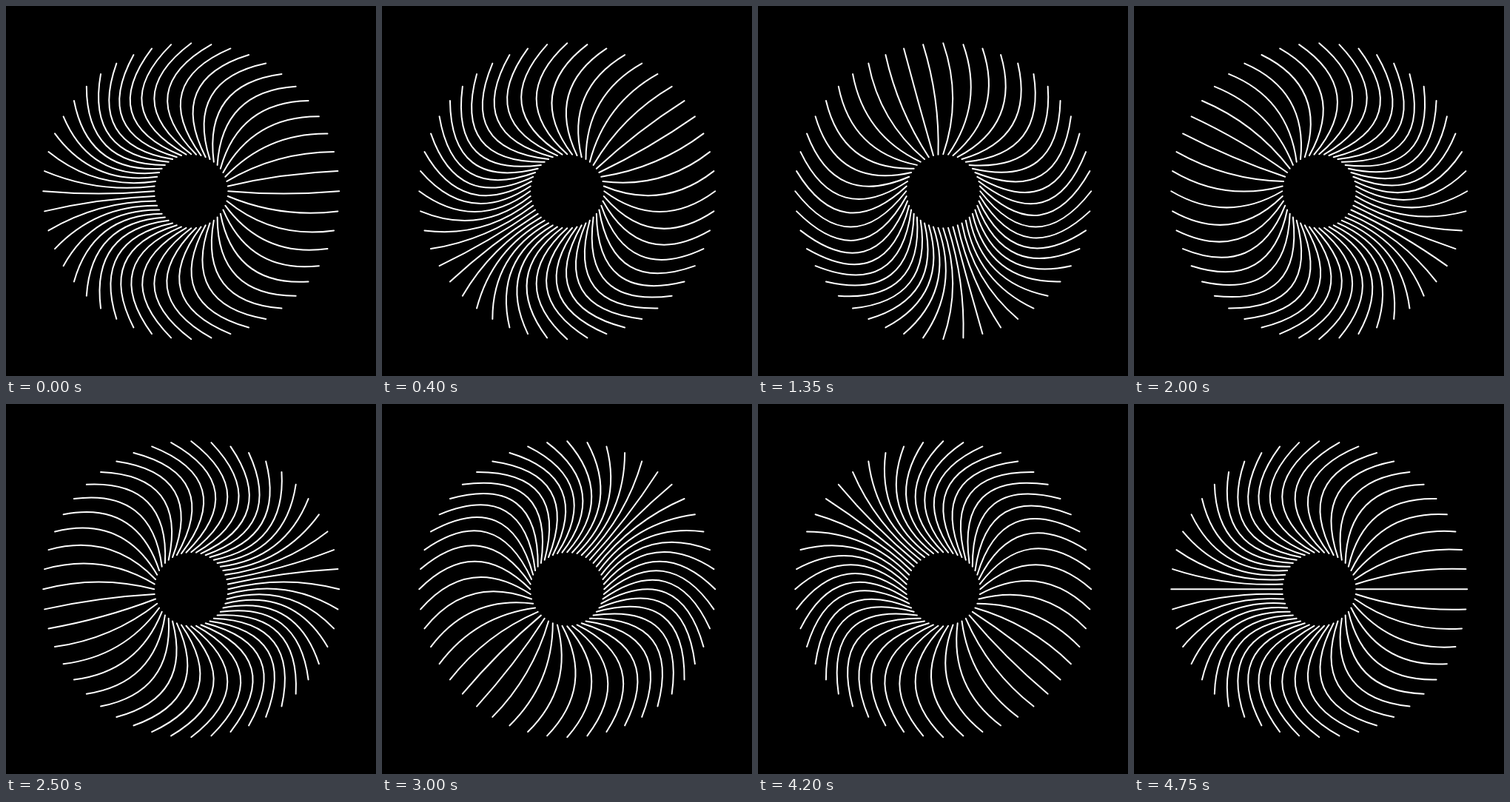
Recreate the animation shown at these times as an HTML page. Size 500 by 500 pixels, loop 4800 ms.

```html
<!DOCTYPE html>
<html lang="en">
<head>
<meta charset="utf-8">
<title>Swaying ring</title>
<style>
  html, body { margin: 0; width: 100%; height: 100%; overflow: hidden; background: #000; }
  svg { display: block; width: 100vw; height: 100vh; }
</style>
</head>
<body>
<svg viewBox="0 0 500 500">
  <path id="rays" fill="none" stroke="#fff" stroke-width="2" stroke-linecap="round"/>
</svg>
<script>
const LOOP = 4800, STEP = 50;
const PER_QUARTER = 12, CENTER = 250.25;
const INNER = 50, OUTER = 200, BEND = 100;
const KAPPA = 0.5523; // handle length of a quarter circle drawn as a cubic
const TAU = Math.PI * 2;
const rays = document.getElementById('rays');

// Rays sit at even parameter steps along four cubic quarter circles.
function angle(i) {
  const t = (i % PER_QUARTER) / PER_QUARTER;
  const rise = t => 3 * (1 - t) ** 2 * t * KAPPA + 3 * (1 - t) * t * t + t ** 3;
  return Math.floor(i / PER_QUARTER) * TAU / 4 + Math.atan2(rise(t), rise(1 - t));
}
const angles = Array.from({ length: 4 * PER_QUARTER }, (_, i) => angle(i));

// Point at distance r along angle a, moved sideways by s.
function point(a, r, s = 0) {
  const x = CENTER + r * Math.cos(a) - s * Math.sin(a);
  const y = CENTER + r * Math.sin(a) + s * Math.cos(a);
  return x.toFixed(2) + ' ' + y.toFixed(2);
}

function ray(a, lean) {
  const side = BEND * Math.sin(lean - a);
  return `M${point(a, INNER)}Q${point(a, (INNER + OUTER) / 2, side)} ${point(a, OUTER)}`;
}

function draw(ms) {
  const tick = Math.floor(ms % LOOP / STEP) + 1;
  const lean = Math.PI - tick * STEP / LOOP * TAU;
  rays.setAttribute('d', angles.map(a => ray(a, lean)).join(''));
}

const start = performance.now();
function loop() {
  draw(performance.now() - start);
  requestAnimationFrame(loop);
}
loop();
</script>
</body>
</html>
```
